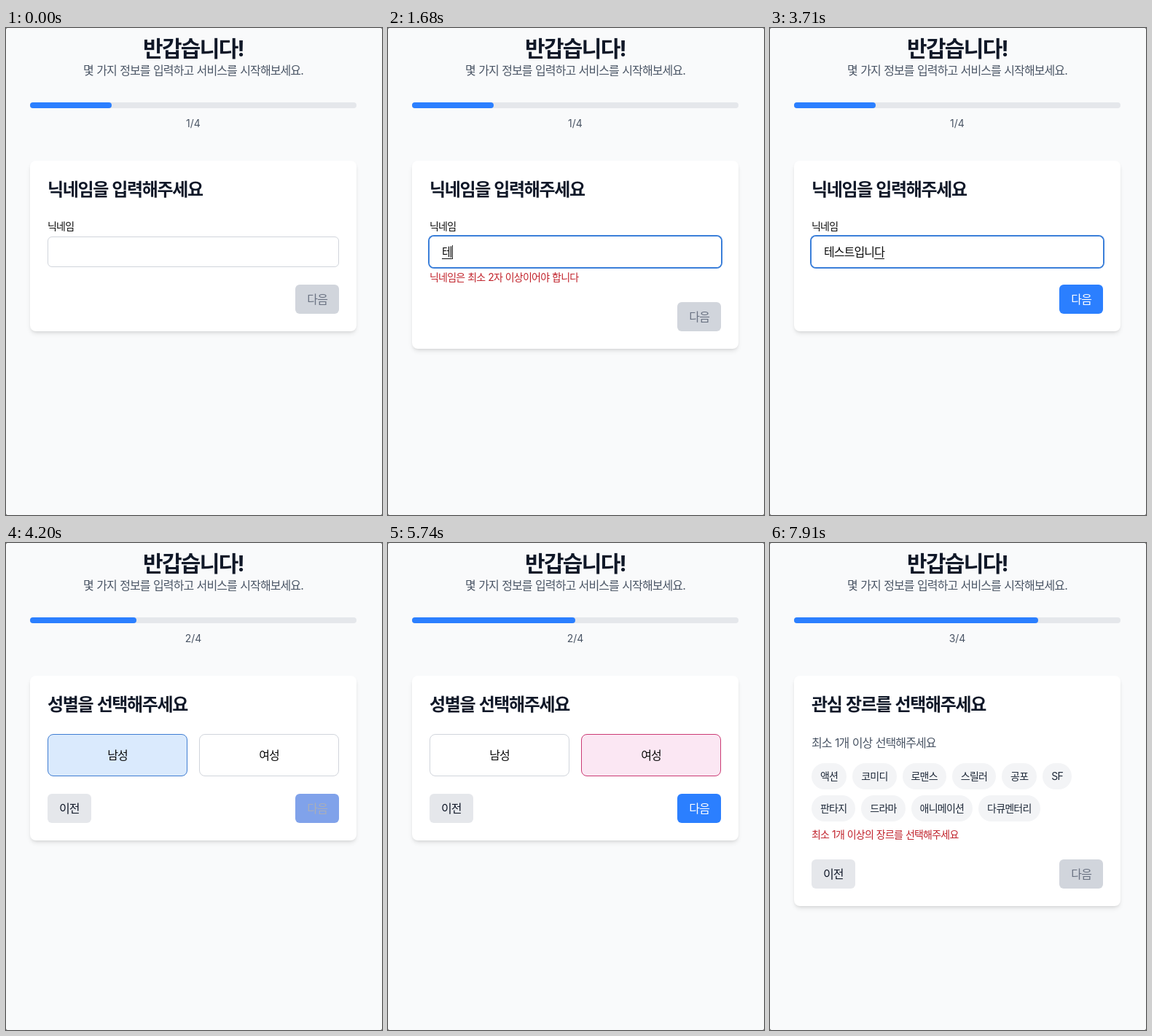
An HTML page for the animation above (8 s loop, 516x668 px).

```html
<!DOCTYPE html>
<html lang="ko">
<head>
<meta charset="utf-8">
<style>
  * { box-sizing: border-box; margin: 0; letter-spacing: -.056em; word-spacing: .045em; }
  html, body { width: 100%; height: 100%; overflow: hidden; background: #555; }
  body { font: 16px/24px Inter, "Noto Sans CJK KR", "Noto Sans CJK", sans-serif; color: #0a0a0a; }
  [hidden] { display: none !important; }

  #stage { position: relative; width: 516px; height: 668px; padding: 10px 35px 0 33px; border-radius: 2px; background: #f9fafb; text-align: center; }
  h1 { font-size: 30px; line-height: 36px; color: #101828; }
  .lead, .hint { color: #4a5565; }
  .bar { height: 8px; margin-top: 32px; border-radius: 4px; background: #e5e7eb; }
  #fill { height: 8px; border-radius: 4px; background: #2b7fff; }
  #count { margin: 11px 0 41px; font-size: 14px; line-height: 20px; letter-spacing: 0; color: #4a5565; }

  .card { padding: 24px; border-radius: 8px; background: #fff; text-align: left;
    box-shadow: 0 4px 6px -1px rgb(0 0 0 / .1), 0 2px 4px -2px rgb(0 0 0 / .1); }
  h2 { margin-bottom: 24px; font-size: 24px; line-height: 32px; color: #101828; }
  .label { margin-bottom: 4px; font-size: 14px; font-weight: 500; line-height: 20px; }
  .error { margin-top: 4px; font-size: 14px; line-height: 20px; color: #c1222b; }

  #field { height: 42px; padding: 8px 16px; border: 1px solid #d1d5dc; border-radius: 6px; white-space: nowrap; }
  #field.focus { border-color: #fff; box-shadow: 0 0 0 2px #3b7fd9; }
  #composing { text-decoration: underline 1px; text-underline-offset: 3px; text-decoration-skip-ink: none; }
  #caret { display: inline-block; width: 1px; height: 19px; margin-right: -1px; vertical-align: -4px; background: #222; }

  .options { display: flex; gap: 16px; }
  .options div { flex: 1; height: 58px; border: 1px solid; border-radius: 8px; line-height: 56px; font-weight: 500; text-align: center; }

  .chips { display: flex; flex-wrap: wrap; gap: 8px; margin: 16px 0 8px; }
  .chips span { padding: 8px 12px; border-radius: 18px; background: #f3f4f6; color: #1e2939; font-size: 14px; line-height: 20px; }

  .nav { display: flex; margin-top: 24px; }
  .nav div { padding: 8px 16px; border-radius: 6px; font-weight: 500; }
  #back { background: #e5e7eb; color: #101828; }
  #next { margin-left: auto; }
</style>
</head>
<body>
<div id="stage">
  <h1>반갑습니다!</h1>
  <p class="lead">몇 가지 정보를 입력하고 서비스를 시작해보세요.</p>
  <div class="bar"><div id="fill"></div></div>
  <p id="count"></p>
  <div class="card">
    <section>
      <h2>닉네임을 입력해주세요</h2>
      <p class="label">닉네임</p>
      <div id="field"><span id="done"></span><span id="composing"></span><span id="caret"></span></div>
      <p class="error" id="nameError"></p>
    </section>
    <section>
      <h2>성별을 선택해주세요</h2>
      <div class="options"><div id="male">남성</div><div id="female">여성</div></div>
    </section>
    <section>
      <h2>관심 장르를 선택해주세요</h2>
      <p class="hint">최소 1개 이상 선택해주세요</p>
      <div class="chips"><span>액션</span><span>코미디</span><span>로맨스</span><span>스릴러</span><span>공포</span><span>SF</span><span>판타지</span><span>드라마</span><span>애니메이션</span><span>다큐멘터리</span></div>
      <p class="error">최소 1개 이상의 장르를 선택해주세요</p>
    </section>
    <div class="nav"><div id="back">이전</div><div id="next">다음</div></div>
  </div>
</div>
<script>
const LOOP = 8000, STEP_2 = 4131, STEP_3 = 7285, FOCUS = 560, BLUR = 4050;
const $ = id => document.getElementById(id);
const sections = document.querySelectorAll('section');

// CSS-style cubic-bezier easing, solved by bisection
const bezier = (x1, y1, x2, y2) => x => {
  if (x <= 0 || x >= 1) return x <= 0 ? 0 : 1;
  const at = (a, b, s) => 3 * (1 - s) ** 2 * s * a + 3 * (1 - s) * s * s * b + s ** 3;
  let lo = 0, hi = 1;
  for (let i = 0; i < 24; i++) {
    const mid = (lo + hi) / 2;
    if (at(x1, x2, mid) < x) lo = mid; else hi = mid;
  }
  return at(y1, y2, lo);
};
const easeInOut = bezier(.4, 0, .2, 1), easeOut = bezier(0, 0, .2, 1);
const mix = (a, b, k) => a.map((v, i) => v + (b[i] - v) * k);
const rgb = c => `rgb(${c.map(Math.round)})`;

// Transitions toward each target in turn; an interrupted one continues from its current value
function transition(t, start, stops, duration = 150, ease = easeInOut) {
  let value = start;
  stops.forEach(([time, target], i) => {
    if (t < time) return;
    const end = Math.min(t, stops[i + 1]?.[0] ?? t);
    value = mix(value, target, ease((end - time) / duration));
  });
  return value;
}

const latest = (t, list) => list.filter(([time]) => t >= time).at(-1);

// time, committed text, syllable being composed
const typing = [
  [0, '', ''], [910, '', 'ㅌ'], [1260, '', ''], [1680, '', '테'], [1960, '', '텟'],
  [2100, '테', '스'], [2240, '테', '슽'], [2380, '테스', '트'], [2520, '테스트', '이'],
  [2590, '테스트', '입'], [2800, '테스트입', '니'], [2940, '테스트입', '닏'], [3080, '테스트입니', '다']
];
const nameErrors = [
  [0, ''], [910, '닉네임은 최소 2자 이상이어야 합니다'], [1260, '닉네임을 입력해주세요'],
  [1680, '닉네임은 최소 2자 이상이어야 합니다'], [2100, '']
];
const caretStates = [[0, false], [FOCUS, true], [1400, false], [1680, true], [3710, false]];

// background and text colour of the next button
const DISABLED = [209, 213, 220, 106, 114, 130];
const ENABLED = [43, 127, 255, 255, 255, 255];
const HOVER = [21, 93, 252, 255, 255, 255];
const buttonStops = [
  [2090, ENABLED], [3900, HOVER], [4143, DISABLED], [4200, HOVER], [4680, ENABLED],
  [7125, HOVER], [STEP_3, DISABLED]
];

// background and border colour of the options
const PLAIN = [255, 255, 255, 209, 213, 220];
const BLUE = [218, 234, 253, 63, 125, 210];
const PINK = [251, 231, 243, 203, 58, 116];

function paint(element, colors, property) {
  element.style.backgroundColor = rgb(colors.slice(0, 3));
  element.style[property] = rgb(colors.slice(3));
}

function render(t) {
  const step = t < STEP_2 ? 0 : t < STEP_3 ? 1 : 2;
  sections.forEach((section, i) => section.hidden = i !== step);
  $('back').hidden = step === 0;
  $('count').textContent = `${step + 1}/4`;
  $('fill').style.width = transition(t, [25], [[STEP_2, [50]], [STEP_3, [75]]], 700, easeOut)[0] + '%';

  const focused = t >= FOCUS && t < BLUR;
  const [, done, composing] = latest(t, typing);
  $('field').classList.toggle('focus', focused);
  $('done').textContent = done + (focused ? '' : composing);
  $('composing').textContent = focused ? composing : '';
  $('caret').hidden = !latest(t, caretStates)[1];
  const error = latest(t, nameErrors)[1];
  $('nameError').textContent = error;
  $('nameError').hidden = !error;

  paint($('male'), transition(t, BLUE, [[5585, PLAIN], [6425, BLUE]]), 'borderColor');
  paint($('female'), transition(t, PLAIN, [[5585, PINK], [6425, PLAIN]]), 'borderColor');
  paint($('next'), transition(t, DISABLED, buttonStops), 'color');
}

const begin = performance.now();
function tick() {
  render((performance.now() - begin) % LOOP);
  requestAnimationFrame(tick);
}
tick();
</script>
</body>
</html>
```
